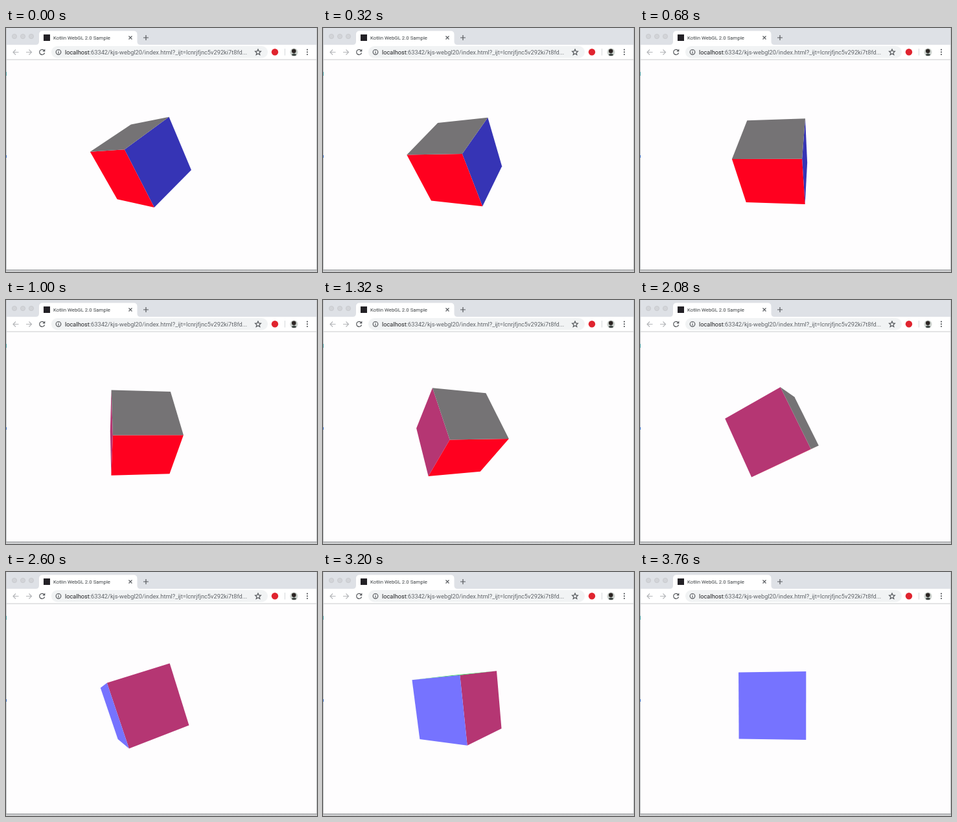
These frames come from a looping animation (480 by 378 pixels, 3800 ms). An HTML page:

```html
<!DOCTYPE html>
<html lang="en">
<head>
<meta charset="utf-8">
<title>Rotating cube</title>
<style>
  html, body { margin: 0; width: 100%; height: 100%; overflow: hidden; }
  svg { display: block; width: 480px; height: 378px; font-family: Roboto, sans-serif; }
  .line { fill: none; stroke: #55585c; stroke-width: 1.2; }
  .off { stroke: #b4b6b9; }
</style>
</head>
<body>
<svg viewBox="0 0 480 378">
  <defs>
    <linearGradient id="shadow" x2="0" y2="1">
      <stop stop-color="#a9abad"/>
      <stop offset="1" stop-color="#d8d9da"/>
    </linearGradient>
  </defs>

  <!-- desktop edge and window -->
  <rect width="480" height="378" fill="#c6c8cb"/>
  <rect y="374" width="480" height="4" fill="url(#shadow)"/>
  <path d="M0 68h1v6h-1z" fill="#4da3a6"/>
  <path d="M0 197h1v4h-1z" fill="#3a6fc4"/>
  <rect x="1" width="478" height="374" fill="#fefdfe"/>

  <!-- tab strip -->
  <rect x="1" width="478" height="26" fill="#dee1e6"/>
  <g fill="#d2d4d8" stroke="#c3c5c9" stroke-width=".7">
    <circle cx="13" cy="13" r="3.6"/>
    <circle cx="26" cy="13" r="3.6"/>
    <circle cx="39" cy="13" r="3.6"/>
  </g>
  <path d="M46 26q5 0 5-5V10q0-5.500 5.500-5.500H197q5.500 0 5.500 5.500V21q0 5 5 5z" fill="#fff"/>
  <rect x="58" y="10" width="10" height="10" fill="#232126"/>
  <text x="73" y="18" font-size="7.85" fill="#3c4043">Kotlin WebGL 2.0 Sample</text>
  <path class="line" d="M189.500 12.500l5 5m0-5l-5 5M212 15h8m-4-4v8"/>

  <!-- toolbar -->
  <rect x="1" y="26" width="478" height="23" fill="#fff"/>
  <path d="M1 49h478" stroke="#c9cacc"/>
  <path class="line off" d="M19.500 37.500h-8.500m4-4l-4 4 4 4M31 37.500h8.500m-4-4l4 4-4 4"/>
  <path class="line" d="M59 35a4 4 0 1 0 .6 3.500"/>
  <path d="M60.300 32.500v4h-4z" fill="#55585c"/>
  <rect x="70" y="28" width="334" height="18.500" rx="9.250" fill="#f1f3f4"/>
  <circle class="line" cx="81" cy="37.300" r="3.800" stroke-width="1"/>
  <path class="line" d="M81 36.800v2.600M81 34.700v1.100"/>
  <text x="91" y="40.500" font-size="9.25" fill="#606469"><tspan fill="#202124">localhost</tspan>:63342/kjs-webgl20/index.html?_ijt=lcnrjfjnc5v292ki7t8fd...</text>
  <path class="line" stroke-width="1" d="M389 33l1.300 2.900 3.100.3-2.300 2.100.7 3.100-2.800-1.700-2.800 1.700.7-3.100-2.300-2.100 3.100-.3z"/>
  <circle cx="415" cy="37.300" r="5.200" fill="#e0242f"/>
  <path d="M430.500 32v10.500" stroke="#d5d7da"/>
  <circle cx="444.500" cy="37.300" r="6" fill="#cdd3cf"/>
  <circle cx="444.300" cy="35.800" r="3.300" fill="#2b2523"/>
  <path d="M440.500 41.700q4-4.500 8 0-4 3.200-8 0z" fill="#3f4744"/>
  <g fill="#55585c">
    <circle cx="465" cy="33.600" r="1.100"/>
    <circle cx="465" cy="37.300" r="1.100"/>
    <circle cx="465" cy="41" r="1.100"/>
  </g>

  <g id="cube"></g>
</svg>
<script>
const LOOP = 3800, STEP = 40;
const FOCAL = 372, DISTANCE = 8.11, CENTER = [208.7, 206.1];

// Each face: axis index, side, colour
const faces = [
  [0, 1, '#b53673'], [0, -1, '#3634b5'],
  [1, 1, '#12cf3c'], [1, -1, '#ff001f'],
  [2, 1, '#7673ff'], [2, -1, '#757375'],
].map(([axis, side, fill]) => {
  const polygon = document.createElementNS('http://www.w3.org/2000/svg', 'polygon');
  polygon.setAttribute('fill', fill);
  document.getElementById('cube').append(polygon);
  return { axis, side, polygon };
});

const corners = [[1, 1], [1, -1], [-1, -1], [-1, 1]];

function project([x, y, z]) {
  const scale = FOCAL / (DISTANCE - z);
  return [CENTER[0] + x * scale, CENTER[1] - y * scale];
}

// Cube axes after pitching about x, then turning about y
function cubeAxes(seconds) {
  const yaw = (128.8 + 60 * seconds) * Math.PI / 180;
  const pitch = (57.6 - 15 * seconds) * Math.PI / 180;
  const sy = Math.sin(yaw), cy = Math.cos(yaw);
  const sp = Math.sin(pitch), cp = Math.cos(pitch);
  return [[cy, 0, -sy], [sp * sy, cp, sp * cy], [cp * sy, -sp, cp * cy]];
}

function draw(now) {
  const time = Math.floor(now % LOOP / STEP) * STEP;
  const axes = cubeAxes(time / 1000);
  for (const { axis, side, polygon } of faces) {
    const normal = axes[axis], u = axes[(axis + 1) % 3], v = axes[(axis + 2) % 3];
    const visible = side * normal[2] * DISTANCE > 1;
    polygon.style.display = visible ? '' : 'none';
    const points = corners.map(([a, b]) =>
      project(normal.map((n, i) => side * n + a * u[i] + b * v[i])));
    polygon.setAttribute('points', points.join(' '));
  }
}

const start = performance.now();
function tick() {
  draw(performance.now() - start);
  requestAnimationFrame(tick);
}
tick();
</script>
</body>
</html>
```
